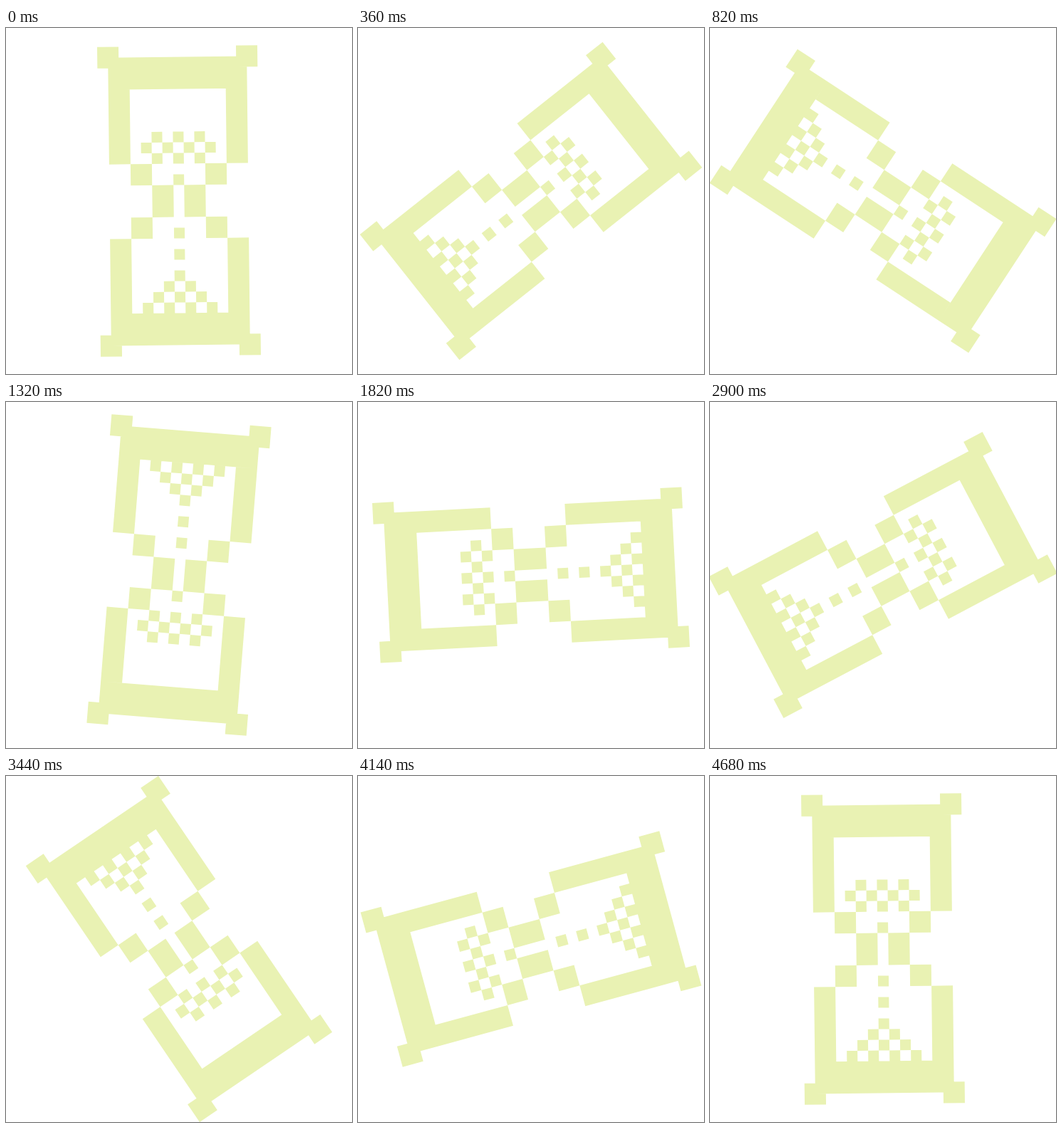
Animation, 486 px wide and 486 px high, one loop 4.82 s. Source, as an HTML page with a canvas:

```html
<!DOCTYPE html>
<html lang="en">
<head>
<meta charset="utf-8">
<title>Hourglass</title>
<style>
  html, body { margin: 0; width: 100%; height: 100%; overflow: hidden; background: #fff; }
  canvas { display: block; }
</style>
</head>
<body>
<canvas id="stage" width="486" height="486"></canvas>
<script>
const ctx = document.getElementById('stage').getContext('2d');
const SIZE = 486, CELL = 15, LOOP = 4820, TICK = 20;
const TILT = -0.66;

// Each half turn runs linearly from start to end (ms), with a rest in between.
const turns = [[24.5, 1180], [1288, 2380], [2495, 3656], [3761, 4665.5]];

function buildHourglass() {
  const path = new Path2D();
  const block = (x, y, w, h) => path.rect(x * CELL, y * CELL, w * CELL, h * CELL);
  const grains = (y, ...xs) => xs.forEach(x => block(x - 0.5, y, 1, 1));

  // Frame, mirrored in both axes
  block(-6.5, -13.5, 13, 3);
  block(-6.5, 10.5, 13, 3);
  for (const side of [-1, 1]) {
    const column = (x, y, w, h) => block(side < 0 ? -x - w : x, y, w, h);
    for (const end of [-1, 1]) {
      const part = (x, y, w, h) => column(x, end < 0 ? -y - h : y, w, h);
      part(5.5, 12.5, 2, 2);
      part(4.5, 3.5, 2, 7);
      part(2.5, 1.5, 2, 2);
    }
    column(0.5, -1.5, 2, 3);
  }

  // Sand above the neck, falling, and piled up
  grains(-6.5, -2, 0, 2);
  grains(-5.5, -3, -1, 1, 3);
  grains(-4.5, -2, 0, 2);
  [-2.5, 2.5, 4.5].forEach(y => grains(y, 0));
  for (let row = 0; row < 4; row++) {
    for (let x = -row; x <= row; x += 2) grains(6.5 + row, x);
  }
  return path;
}

const hourglass = buildHourglass();

function angleAt(time) {
  return turns.reduce((sum, [start, end]) => {
    const progress = (time - start) / (end - start);
    return sum + 180 * Math.min(1, Math.max(0, progress));
  }, TILT);
}

function draw(now) {
  const time = Math.floor((now % LOOP) / TICK) * TICK;
  ctx.setTransform(1, 0, 0, 1, 0, 0);
  ctx.fillStyle = '#fff';
  ctx.fillRect(0, 0, SIZE, SIZE);
  ctx.translate(SIZE / 2, SIZE / 2);
  ctx.rotate(angleAt(time) * Math.PI / 180);
  ctx.fillStyle = '#e9f2b3';
  ctx.fill(hourglass);
}

const begin = performance.now();
function frame() {
  draw(performance.now() - begin);
  requestAnimationFrame(frame);
}
frame();
</script>
</body>
</html>
```
